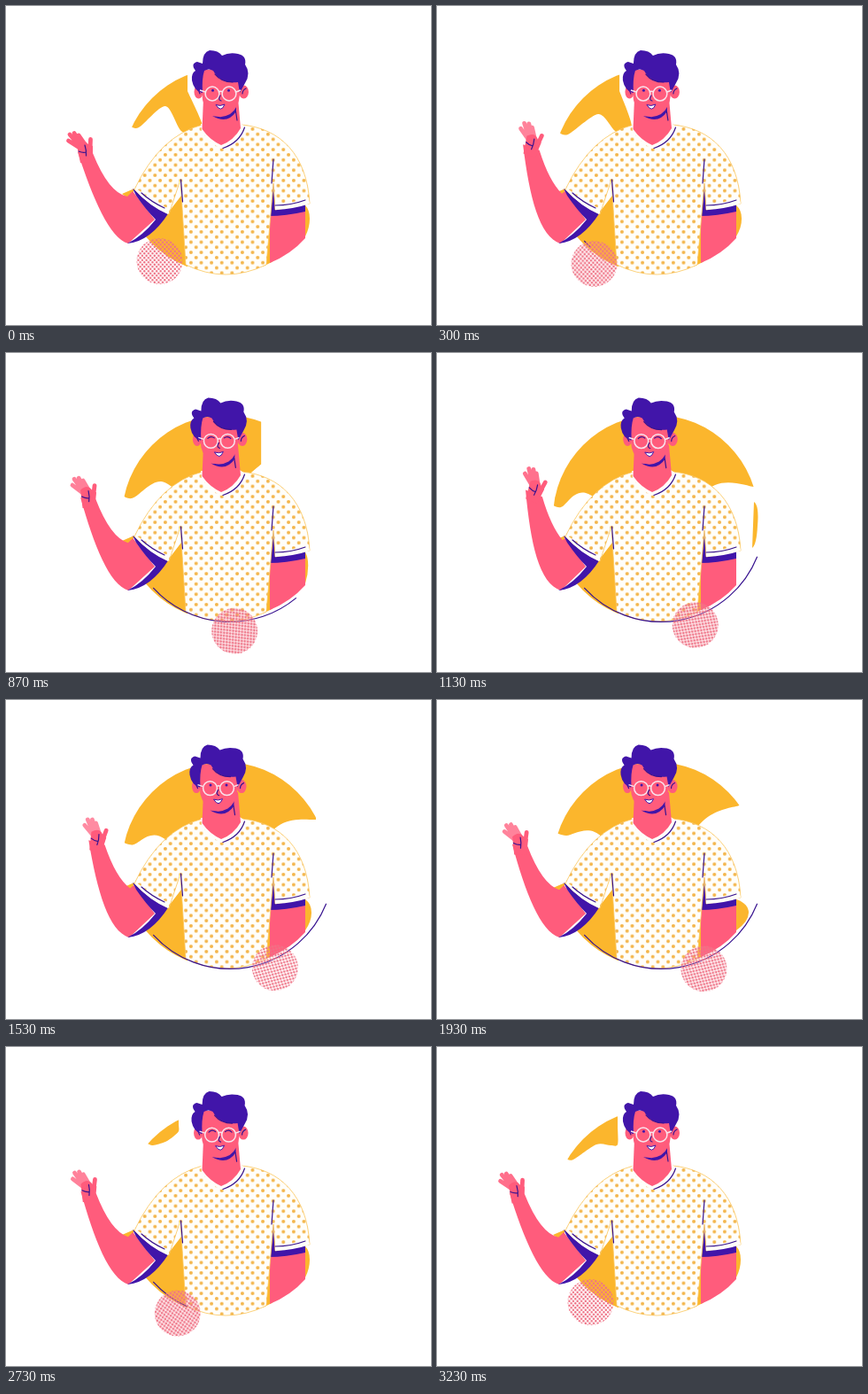
These frames come from a looping animation (480x360 px, 3260 ms). An HTML page:

```html
<!DOCTYPE html>
<html lang="en">
<head>
<meta charset="utf-8">
<title>Waving man</title>
<style>
html, body { margin: 0; width: 100%; height: 100%; overflow: hidden; background: #fff; }
svg { display: block; width: 100vw; height: 100vh; }
.y { fill: #fbb62d; }
.p { fill: #ff5c7c; }
.v { fill: #4115a9; }
.w { fill: #fffefa; }
.l { fill: none; stroke: #37128f; stroke-width: 1.2; stroke-linecap: round; stroke-linejoin: round; }
.g { fill: none; stroke: #f9e6ee; stroke-width: 1.5; }
.f { fill: none; stroke: #ff5c7c; stroke-width: 4.8; stroke-linecap: round; }
</style>
</head>
<body>
<svg viewBox="0 0 480 360">
  <defs>
    <clipPath id="disc"><circle cx="247" cy="186" r="116"/></clipPath>
    <pattern id="shirtDots" x="148" y="136" width="11.6" height="11.6" patternUnits="userSpaceOnUse">
      <g fill="#f3b54a"><circle cx="2.9" cy="2.9" r="2"/><circle cx="8.7" cy="8.7" r="2"/></g>
    </pattern>
    <pattern id="ballDots" width="4.6" height="5" patternUnits="userSpaceOnUse">
      <g fill="#ee7386"><circle cx="1.2" cy="1.3" r="1.25"/><circle cx="3.5" cy="3.8" r="1.25"/></g>
    </pattern>
    <path id="shirt" d="M222 134Q174 146 145 207Q161 224 184 235L197 196L203 292Q248 314 294 292L302 200L304 230L343 223C340 168 310 138 266 134L243 157Z"/>
  </defs>

  <g class="y" clip-path="url(#disc)">
    <path id="blob"/>
    <path d="M181 236L201 210L206 310L150 268Z"/>
    <path d="M293 235H301V300H290Z"/>
  </g>
  <path class="y" id="band" d="M358 168Q364 172 362 195Q361 216 356 220Z"/>
  <path class="y" id="side"/>
  <path class="y" d="M131 212L145 206L141 219Z"/>

  <path class="p" id="arm"/>
  <path class="v" d="M143 206L184 233Q163 266 137 268Q154 260 169 241Q158 230 147 214Z"/>
  <g id="hand">
    <path class="p" d="M80 157Q87 149 93 156L98 158V176L84 177Z"/>
    <g id="fingers">
      <path class="f" d="M83 160L70.5 152M83 158L72 145M86 157L77 143.5M89 156L82 146"/>
    </g>
    <path class="f" d="M95.5 150.5L95 163"/>
    <path class="l" d="M82 164Q87 166 90.5 165M89 157Q91 163 90.5 169"/>
  </g>

  <path class="p" d="M298 234L338 229V262Q322 280 298 290Z"/>
  <path class="v" d="M302 172L305 229L338 223V232Q316 237 297 237Z"/>

  <use href="#shirt" class="w" stroke="#fbc75c" stroke-width=".8"/>
  <use href="#shirt" fill="url(#shirtDots)"/>
  <path class="w" d="M150 208Q164 221 185 229L183 235Q162 226 146 208ZM304 223Q325 223 341 216L343 223Q326 229 304 230Z"/>
  <path class="l" d="M153 211Q164 221 179 228M304 225Q322 225 338 219M197.5 196L199.5 221M302 173L300 200"/>

  <path class="w" d="M220 133L221 142Q232 156 243 161Q260 155 270 136L264 132Z"/>
  <path class="l" d="M269.5 137Q264 154 245 160.5"/>
  <path class="p" d="M223 104L221.5 139Q230 151 243 157Q257 152 265 138L262 104Z"/>

  <g id="head">
    <ellipse class="p" cx="217.5" cy="97" rx="5" ry="7.5"/>
    <ellipse class="p" cx="268.5" cy="97" rx="5.5" ry="7.5"/>
    <path class="l" d="M215 93Q218 95 219 99M271 93Q267 95 267 99"/>
    <path class="v" d="M233 124Q248 127 260 113V119Q250 134 233 124Z"/>
    <path class="l" d="M259.5 119L261 129"/>
    <path class="p" d="M219 72H264V100Q263 115 253 122Q244 127 236 124Q225 118 222 106Z"/>
    <path class="v" d="M221 98Q212 95 210 84Q209 76 214 73Q208 65 216 63L222 65Q222 52 230 50Q240 50 244 56Q252 52 262 54Q272 56 270 66Q277 76 270 87L264 98L262 86Q242 88 234 73Q229 70 224 73Q221 82 222 98Z"/>
    <path class="l" d="M236 77Q243 86 256 86"/>
    <g class="g">
      <circle cx="233" cy="99" r="7.9"/><circle cx="252" cy="99" r="7.9"/>
      <path d="M240.5 97Q242.5 95.5 244.5 97M225 97L219 95M260 97L265 95"/>
    </g>
    <g id="open" class="v"><circle cx="233.5" cy="95.3" r="1.5"/><circle cx="251.5" cy="95.3" r="1.5"/></g>
    <path id="shut" class="l" d="M229.5 96Q233 92.5 237 95.5M248 95.5Q252 92.5 255.5 96"/>
    <path class="l" d="M242 101Q239 106 243 107"/>
    <path d="M237 111.5Q242 113.5 247 111Q243 121 237 111.5Z" fill="#fff" stroke="#4115a9"/>
  </g>

  <path class="l" id="arc"/>
  <g id="ball">
    <g transform="translate(173.5 288)">
      <circle id="haze" r="25.5" fill="#f58b9b"/>
      <circle r="26" fill="url(#ballDots)"/>
    </g>
  </g>
</svg>
<script>
const LOOP = 3260, WAVES = 7;
const $ = id => document.getElementById(id);
const set = (id, name, value) => $(id).setAttribute(name, value);
const show = (id, on) => set(id, "visibility", on ? "visible" : "hidden");
const mix = (a, b, k) => a + (b - a) * k;
const mixAll = (a, b, k) => a.map((v, i) => mix(v, b[i], k));

// Time, right edge of the side sliver, lower edge of the blob from left to right
const poses = [
  [0, 343, [138,134, 150,137, 180,113, 199,142, 223,140, 205,96]],
  [570, 345, [132,147, 146,152, 184,130, 206,142, 217,132, 207,96]],
  [1130, 338, [125,168, 140,174, 168,158, 240,200, 314,149, 358,151]],
  [1930, 352, [130,148, 146,153, 178,149, 240,190, 306,132, 342,119]],
  [2370, 345, [136,142, 150,145, 184,131, 202,142, 216,136, 209,95]],
  [2730, 343, [160,109, 166,111, 180,107, 189,101, 195,95, 195,88]],
  [3230, 343, [146,126, 154,127, 180,110, 196,111, 204,110, 204,90]]
];

// Forearm at both ends of the wave
const armOut = [81,165, 98,217, 117,262, 138,268, 168,241, 143,209, 137,215, 116,211, 98,166];
const armIn = [101,154, 106,215, 115,260, 140,268, 168,241, 145,209, 142,211, 129,194, 120,162];

// Smooth lower edge, closed high above the disc that cuts it
function blobPath(c) {
  const n = c.length / 2;
  const at = i => {
    const j = Math.max(0, Math.min(n - 1, i)) * 2;
    return [c[j], c[j + 1]];
  };
  let d = "M" + at(0);
  for (let i = 0; i < n - 1; i++) {
    const [a, b, e, f] = [at(i - 1), at(i), at(i + 1), at(i + 2)];
    const c1 = b.map((v, k) => v + (e[k] - a[k]) / 7);
    const c2 = e.map((v, k) => v - (f[k] - b[k]) / 7);
    d += `C${c1} ${c2} ${e}`;
  }
  return `${d}V30H${c[0]}Z`;
}

function armPath(c) {
  const p = i => c[2 * i] + " " + c[2 * i + 1];
  return `M${p(0)}C${p(1)} ${p(2)} ${p(3)}L${p(4)}L${p(5)}L${p(6)}Q${p(7)} ${p(8)}Z`;
}

// There and back again over one loop
function sweep(t) {
  const p = Math.pow(1 - Math.abs(1 - 2 * t / LOOP), 0.93);
  return p < 0.5 ? 4 * p ** 3 : 1 - 4 * (1 - p) ** 3;
}

function arcPath(from, to) {
  const pt = deg => {
    const a = deg * Math.PI / 180;
    return `${253 + 117 * Math.sin(a)} ${186.4 + 117 * Math.cos(a)}`;
  };
  return `M${pt(from)}A117 117 0 0 0 ${pt(to)}`;
}

function drawBlob(t) {
  let i = 0;
  while (i < poses.length - 2 && t >= poses[i + 1][0]) i++;
  const [a, b] = [poses[i], poses[i + 1]];
  const k = Math.min(1, (t - a[0]) / (b[0] - a[0]));
  const edge = mix(a[1], b[1], k);
  set("blob", "d", blobPath(mixAll(a[2], b[2], k)));
  set("side", "d", `M338 225Q${edge} 230 ${edge} 240Q${edge} 250 338 260Z`);
  show("band", t > 1000 && t < 1500);
}

function drawArm(t) {
  const phase = 2 * Math.PI * WAVES * t / LOOP;
  const u = (1 - Math.cos(phase)) / 2;
  set("arm", "d", armPath(mixAll(armOut, armIn, u)));
  set("hand", "transform", `translate(${22 * u} ${-9 * u}) rotate(${28 * u} 90 165)`);
  set("fingers", "opacity", 1 - 0.3 * Math.abs(Math.sin(phase)));
}

function draw(t) {
  const e = sweep(t);
  drawBlob(t);
  drawArm(t);
  set("head", "transform", `translate(${-2.5 * e} ${0.6 * e})`);
  const closed = t > 450 && t < 1500 || t > 2680 && t < 2800;
  show("open", !closed);
  show("shut", closed);
  show("arc", e > 0.01);
  set("arc", "d", arcPath(-47.6, Math.min(68, -47.6 + 133 * e)));
  set("ball", "transform", `rotate(${-62 * e} 250.5 186.5)`);
  set("haze", "opacity", 0.3 * Math.abs(Math.sin(2 * Math.PI * t / LOOP)));
}

const start = performance.now();
function tick() {
  draw(Math.max(0, performance.now() - start) % LOOP);
  requestAnimationFrame(tick);
}
tick();
</script>
</body>
</html>
```
